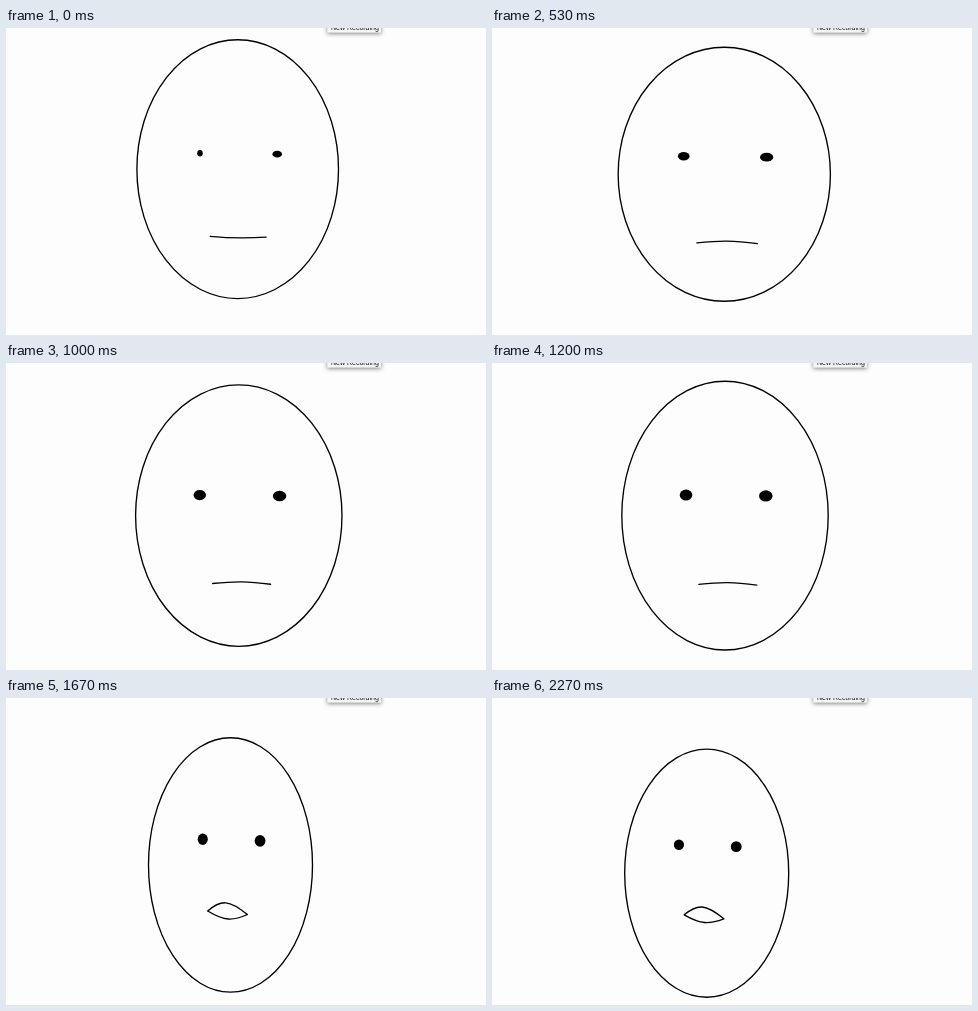
These frames come from a looping animation (480x307 px, 2.34 s). An HTML page:

```html
<!DOCTYPE html>
<html lang="en">
<head>
<meta charset="utf-8">
<title>Face</title>
<style>
html, body { margin: 0; width: 100%; height: 100%; overflow: hidden; background: #fdfdfd; }
svg { display: block; width: 480px; height: 307px; }
.line { fill: none; stroke: #000; stroke-width: 1.35; stroke-linejoin: round; stroke-linecap: round; }
.tip { fill: #f5f5f5; filter: drop-shadow(0 1.5px 2px rgba(0, 0, 0, .5)); }
text { font: 7px "Liberation Sans", Arial, sans-serif; fill: #111; }
</style>
</head>
<body>
<svg viewBox="0 0 480 307">
  <rect class="tip" x="321.3" y="-12" width="53.7" height="16.6"/>
  <text x="325" y="1.5">New Recording</text>
  <ellipse id="head" class="line"/>
  <ellipse id="left"/>
  <ellipse id="right"/>
  <path id="mouth" class="line"/>
</svg>
<script>
const LOOP = 2340, STEPS = 35;

const $ = id => document.getElementById(id);
const ramp = (t, from, to) => Math.min(1, Math.max(0, (t - from) / (to - from)));
const bump = u => Math.sin(Math.PI * u);

function oval(id, cx, cy, rx, ry) {
  const values = { cx, cy, rx, ry };
  for (const name in values) $(id).setAttribute(name, values[name]);
}

// A lip runs from corner to corner; sag is its height at the middle.
function lip(x, y, half, tilt, sag, skew) {
  const cx = x + skew, cy = y + sag * 4 / 3, pull = half * .2;
  return `M${x - half} ${y - tilt}C${cx - pull} ${cy} ${cx + pull} ${cy} ${x + half} ${y + tilt}`;
}

function draw(step) {
  // Stages: frown and sink, open the mouth, drop to the left, drift.
  const frown = ramp(step, 0, 4);
  const sink = ramp(step, 0, 12) ** 2;
  const open = ramp(step, 18, 22);
  const slide = ramp(step, 22, 28);
  const drop = 1 - (1 - slide) ** 2;
  const drift = ramp(step, 28, 34);

  const x = 231.7 + 1.6 * ramp(step, 0, 22) - 17.6 * slide - drift;
  const y = 141.2 + 11.4 * sink - 4 * open + 24.5 * drop + 2.1 * drift;
  const rx = 100.8 + 2.4 * ramp(step, 0, 8) + 3 * bump(ramp(step, 0, 14))
    - 21.2 * ramp(step, 18, 22.5);
  const ry = 129.4 - 2.4 * frown + 7.4 * ramp(step, 12, 18)
    + 2.4 * open + 7.7 * bump(open) - 12.8 * drop;
  oval("head", x, y, rx, ry);

  const eyeY = 125.7 + 6.8 * sink - 11.6 * open + 28.2 * drop - 1.4 * drift;
  const gap = .53 * rx - 14.8;
  const tilt = .45 + .5 * drop;
  const wake = Math.exp(-step / 5);
  const eyeH = 3.2 + 2.5 * ramp(step, 0, 20) - .5 * drift;
  oval("left", x + .9 - gap, eyeY - tilt, .062 * rx * (1 - .56 * wake), eyeH);
  oval("right", x + .9 + gap, eyeY + tilt, .066 * rx * (1 - .28 * wake), eyeH + .2);

  const mouthX = x + .5 + 2.3 * frown - 6.5 * open + drop;
  const mouthY = 208.7 + 13 * ramp(step, 0, 16) - 24.5 * open + 23.4 * drop - 1.8 * drift;
  const half = .43 * rx - 15.4;
  const slant = .4 + .6 * open + drop;
  const curl = 1.4 - 3.4 * frown;
  const upper = lip(mouthX, mouthY, half, slant, curl - 8.4 * open + .6 * drop, -2.5 * open);
  const lower = lip(mouthX, mouthY, half, slant, curl + 10 * open - 2.3 * drop, open);
  $("mouth").setAttribute("d", upper + lower);
}

const start = performance.now();
function tick() {
  const time = (performance.now() - start) % LOOP;
  draw(Math.min(STEPS - 1, Math.floor((time + 4) * 15 / 1000)));
  requestAnimationFrame(tick);
}
tick();
</script>
</body>
</html>
```
